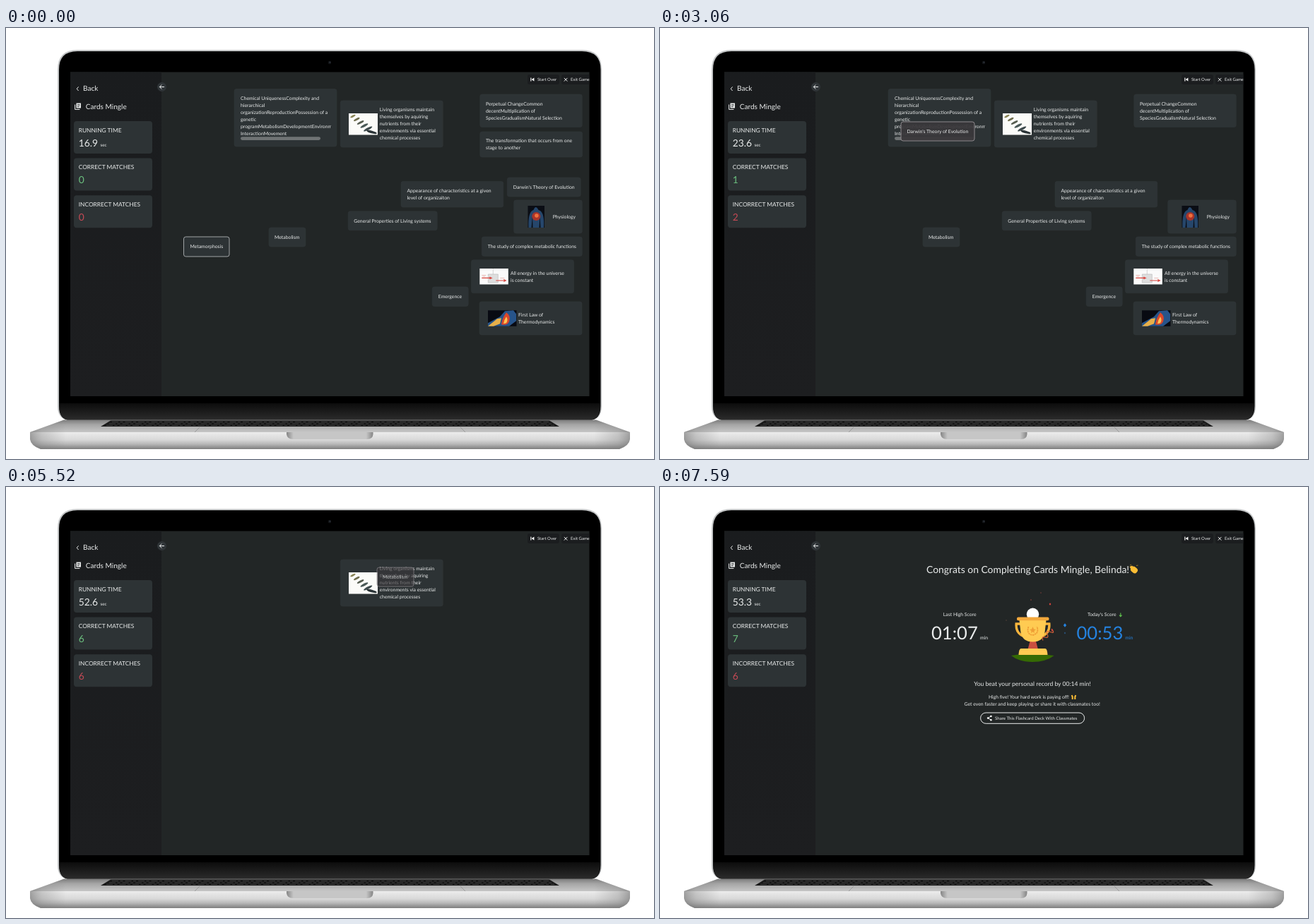
Animation, 917 px wide and 611 px high, one loop 7.62 s. Source, as an HTML page:

```html
<!DOCTYPE html>
<html lang="en">
<head>
<meta charset="utf-8">
<title>Flashcard matching game</title>
<style>
  html, body { margin: 0; width: 100%; height: 100%; overflow: hidden; background: #fff; }
  svg { display: block; width: 917px; height: 611px; }
  text { font: 6.85px Lato, "Open Sans", sans-serif; fill: #e9ebeb; text-rendering: geometricPrecision; white-space: pre; }
  .box { fill: #2d3335; }
  .card rect.box { stroke: #33393b; stroke-width: .5; }
  .card.lit rect.box { stroke: #a0a4a5; stroke-width: 1; }
  .card.held rect.box { fill: #3a373b; fill-opacity: .93; stroke: #8d888c; stroke-width: 1; }
  .label { font-size: 8.4px; }
  .value { font-size: 13.8px; }
  .unit { font-size: 6.4px; }
  .nav { font-size: 10.05px; }
  .tool { font-size: 6px; }
  .good { fill: #6cc07f; }
  .bad { fill: #c64a55; }
  .title { font-size: 13.9px; }
  .time { font-size: 25.6px; }
  .today { fill: #2583e0; }
  .line { fill: none; stroke: #eceeee; stroke-width: 1; }
</style>
</head>
<body>
<svg viewBox="0 0 917 611" xmlns="http://www.w3.org/2000/svg">
  <defs>
    <linearGradient id="chin" x2="0" y2="1"><stop stop-color="#0c0c0c"/><stop offset="1" stop-color="#2c2c2c"/></linearGradient>
    <linearGradient id="deck" x2="0" y2="1"><stop stop-color="#7c7c7c"/><stop offset=".4" stop-color="#a6a6a6"/><stop offset="1" stop-color="#c6c6c6"/></linearGradient>
    <linearGradient id="front" x2="0" y2="1"><stop stop-color="#ececec"/><stop offset=".45" stop-color="#d8d8d8"/><stop offset=".7" stop-color="#b8b8b8"/><stop offset="1" stop-color="#7e7e7e"/></linearGradient>
    <linearGradient id="ends">
      <stop stop-color="#555" stop-opacity=".5"/><stop offset=".02" stop-color="#777" stop-opacity=".3"/><stop offset=".06" stop-color="#777" stop-opacity="0"/>
      <stop offset=".94" stop-color="#777" stop-opacity="0"/><stop offset=".98" stop-color="#777" stop-opacity=".3"/><stop offset="1" stop-color="#555" stop-opacity=".5"/>
    </linearGradient>
    <linearGradient id="notch"><stop stop-color="#858585"/><stop offset=".08" stop-color="#c6c6c6"/><stop offset=".92" stop-color="#c6c6c6"/><stop offset="1" stop-color="#858585"/></linearGradient>
    <linearGradient id="side" x2="0" y2="1"><stop stop-color="#1a1c1e"/><stop offset="1" stop-color="#1d1e20"/></linearGradient>
    <clipPath id="screen"><rect x="91" y="62.5" width="734.5" height="459.5"/></clipPath>
    <clipPath id="scroll"><rect x="331" y="88" width="129" height="78"/></clipPath>
  </defs>

  <!-- lid -->
  <path d="M73 59Q73 31 101 31H815Q843 31 843 59V536Q843 556 825 556H91Q73 556 73 536Z" fill="#c3c5c6"/>
  <path d="M75 59Q75 33 101 33H815Q841.5 33 841.5 59V536Q841.5 556 825 556H91Q75 556 75 536Z"/>
  <path d="M75.5 532H841V537Q840 556 825 556H91Q76 556 75.5 537Z" fill="url(#chin)"/>
  <circle cx="458" cy="49" r="2.2" fill="#15171a"/><circle cx="458.4" cy="48.6" r=".8" fill="#39414c"/>

  <!-- base -->
  <path d="M82 555.5H835L883 573H34Z" fill="url(#deck)"/>
  <path d="M82 555.5H835L883 573H34Z" fill="url(#ends)"/>
  <path d="M148 556.5H769L783 565H134Z" fill="#191919"/>
  <path d="M150 558.5H768M146 561H772M142 563.4H776" stroke="#4a4a4a" stroke-width=".8" stroke-dasharray="9 2.5 4 3"/>
  <path d="M274 566L267 573M643 566L650 573" stroke="#8b8b8b" stroke-width=".7"/>
  <path d="M34 573H883V583Q882 592 868 597H49Q35 592 34 583Z" fill="url(#front)"/>
  <path d="M34 573H883V583Q882 592 868 597H49Q35 592 34 583Z" fill="url(#ends)"/>
  <path d="M397 573H519.5V576Q519 583 511 583H406Q398 583 397 576Z" fill="url(#notch)"/>

  <g clip-path="url(#screen)">
    <rect x="91" y="62" width="735" height="460" fill="#222626"/>
    <rect x="91" y="62" width="129" height="460" fill="url(#side)"/>

    <path class="line" d="M102.6 83.4L100.2 86.2L102.6 89"/>
    <text class="nav" x="109" y="88.8">Back</text>
    <path d="M99.5 106.5H106V113.5H99.5Z" fill="#eceeee"/>
    <path class="line" d="M97.6 108.5V115.4H104.4"/>
    <path d="M101 108.5H104.7M101 110.1H104.7M101 111.7H103.4" stroke="#1b1d1f" stroke-width=".7"/>
    <text class="nav" x="112.8" y="115.4">Cards Mingle</text>
    <g id="stats"></g>
    <circle cx="220.5" cy="83.5" r="6.5" fill="#303538"/>
    <path class="line" d="M224 83.5H217.4M220.3 80.5L217.3 83.5L220.3 86.5"/>

    <rect x="738" y="66" width="45" height="14" rx="3" fill="#1b1d1f"/>
    <rect x="786" y="66" width="46" height="14" rx="3" fill="#1b1d1f"/>
    <path d="M742.3 70.6H743.4V75.6H742.3ZM747.4 70.6V75.6L743.7 73.1Z" fill="#fff"/>
    <path class="line" d="M789.8 70.9L794.4 75.5M794.4 70.9L789.8 75.5"/>
    <text class="tool" x="752" y="75.2">Start Over</text>
    <text class="tool" x="799" y="75.2">Exit Game</text>

    <g id="board"></g>

    <g id="finish">
      <text class="title" x="377" y="122.2">Congrats on Completing Cards Mingle, Belinda!</text>
      <g fill="#fcbd34"><rect x="666" y="113.5" width="10" height="8" rx="3.6" transform="rotate(40 671 117.5)"/><path d="M664.5 113L668 111.5L673 116L668 119Z"/></g>
      <path d="M665 111L667 110M674 111.5L676.5 111" stroke="#b98b2a" stroke-width=".8"/>
      <text x="400.8" y="183.3">Last High Score</text>
      <text class="time" x="384" y="216.3">01:07</text>
      <text x="453" y="216">min</text>
      <text x="605" y="183.3">Today's Score</text>
      <path d="M651.8 178.5V183.5M650 181.6L651.8 183.6L653.6 181.6" fill="none" stroke="#5fc34d" stroke-width="1.1"/>
      <text class="time today" x="589.5" y="216.3">00:53</text>
      <text class="today" x="658.3" y="216">min</text>

      <path d="M497 239Q527 234 557.5 239Q546 248 527 248Q508 248 497 239Z" fill="#356a04"/>
      <path d="M524 217H531.5L535 230H520.5Z" fill="#cb4f3f"/>
      <path d="M511 229H545Q548 229 548.5 238H507.5Q508 229 511 229Z" fill="#ffcb52"/>
      <circle id="ball" cx="527.5" r="8.7" fill="#fff"/>
      <g id="cup">
        <path id="ears" d="M510 194H504.2Q503 208 516 212M545 194H550.8Q552 208 539 212" fill="none" stroke="#f6b43c" stroke-width="3.4"/>
        <path d="M508.5 189H546.5L544.5 206Q542 219.5 527.5 219.5Q513 219.5 510.5 206Z" fill="#ffcb52"/>
        <rect x="505" y="184.5" width="45.5" height="4.8" rx="2" fill="#f2a83c"/>
        <g id="emblem"><path d="M521.5 198Q518 208 527 210Q537 208 533.5 198" fill="none" stroke="#ef9f35" stroke-width="1.8" stroke-dasharray="2.4 .7"/>
        <path d="M527.5 198L529 201.5L532 202L529.5 204L530 207L527.5 205.3L525 207L525.5 204L523 202L526 201.5Z" fill="#ef9f35"/></g>
      </g>
      <path id="ribbon" d="M-4 5Q-6 1 -2 2T0 -1T3 -3T4 -6" fill="none"/>
      <g id="confetti"></g>

      <text x="444.3" y="282.4" style="font-size:8.56px">You beat your personal record by 00:14 min!</text>
      <text x="465" y="300.2" style="font-size:6.75px">High five! Your hard work is paying off!</text>
      <path d="M583.7 301V297.5L582.7 295.2M587.3 301V297.5L588.3 295.2" stroke="#fcbd34" stroke-width="2" fill="none"/>
      <text x="430.5" y="310.2">Get even faster and keep playing or share it with classmates too!</text>
      <rect class="line" x="453.6" y="320" width="147" height="15.3" rx="7.6"/>
      <path class="line" d="M468.4 325L464.2 327.6L468.4 330.2"/>
      <g fill="#fff"><circle cx="468.4" cy="325" r="1.3"/><circle cx="464.2" cy="327.6" r="1.3"/><circle cx="468.4" cy="330.2" r="1.3"/></g>
      <text x="474" y="329.7" style="font-size:6.14px">Share This Flashcard Deck With Classmates</text>
    </g>
  </g>
</svg>
<script>
const LOOP = 7620, FADE = 100, FINISH = 6265;
const $ = id => document.getElementById(id);

function add(parent, tag, attrs, content) {
  const el = document.createElementNS("http://www.w3.org/2000/svg", tag);
  for (const k in attrs) el.setAttribute(k, attrs[k]);
  if (content) el.textContent = content;
  parent.append(el);
  return el;
}

// sidebar
const stats = ["RUNNING TIME", "CORRECT MATCHES", "INCORRECT MATCHES"].map((label, i) => {
  const y = 132 + i * 52.6, g = $("stats");
  add(g, "rect", { class: "box", x: 96, y, width: 111, height: 46, rx: 4 });
  add(g, "text", { class: "label", x: 102.7, y: y + 15.6 }, label);
  const value = add(g, "text", { class: "value " + ["", "good", "bad"][i], x: 102.7, y: y + 35.8 });
  const number = add(value, "tspan", {});
  if (!i) add(value, "tspan", { class: "unit", dx: 3.5 }, "sec");
  return number;
});

// small pictures, drawn from their top left corner
const pictures = {
  larvae(g) {
    add(g, "rect", { width: 41, height: 30.5, fill: "#fbfbf8" });
    ["#8a8556", "#6f6d4e", "#565d50", "#4b5a58", "#3d4a4c", "#2c3538"].forEach((fill, i) =>
      add(g, "ellipse", { rx: 4 + i * .7, ry: 1.3 + i * .12, fill, transform: `translate(${6 + i * 5.3} ${4 + i * 4.5}) rotate(${i < 5 ? -28 : 15})` }));
  },
  body(g) {
    add(g, "rect", { width: 23.5, height: 31, fill: "#0a0d14" });
    add(g, "path", { d: "M1 31Q0 8 8 6Q11 -2 15 6Q24 8 22.5 31H18L17 15L16 31H7L6.5 15L5 31Z", fill: "#26466b" });
    add(g, "ellipse", { cx: 11.8, cy: 15, rx: 6, ry: 6, fill: "#a8342a" });
    add(g, "circle", { cx: 12.4, cy: 14, r: 2.8, fill: "#f0703c" });
  },
  engine(g) {
    add(g, "rect", { width: 40.5, height: 22.5, fill: "#fafafa" });
    add(g, "path", { d: "M12 8H26V20H12ZM19 0V8", fill: "#dedede", stroke: "#aaa", "stroke-width": .5 });
    add(g, "path", { d: "M3 13.4H16M14 12L17 13.4L14 14.8M23 17H36M34 15.6L37 17L34 18.4", fill: "none", stroke: "#d8453e", "stroke-width": 1.1 });
    add(g, "path", { d: "M3 9.5H9M4 11.2H8M29 13.5H35", stroke: "#e2a5a0", "stroke-width": .7 });
  },
  heat(g) {
    add(g, "rect", { width: 40.5, height: 22.5, fill: "#080a12" });
    add(g, "path", { d: "M0 22.5V18L17 9L24 1L36 0L40 5V15L30 22.5Z", fill: "#27548a" });
    add(g, "path", { d: "M0 22.5L13 12L19 11L17 19L8 22.5Z", fill: "#e8b04a" });
    add(g, "path", { d: "M19 20Q20 11 26 3Q33 8 30 16Q27 22 19 20Z", fill: "#d9472b" });
    add(g, "path", { d: "M22 19Q23 13 26 9Q29 14 26 18Z", fill: "#ffc554" });
  }
};

// id, x, y, w, h, text x, lines, picture [name, x, y]
const cards = {};
[
  ["traits", 323, 86.5, 145, 81.5, 332, ["Chemical UniquenessComplexity and", "hierarchical", "organizationReproductionPossession of a", "genetic", "programMetabolismDevelopmentEnvironment", "InteractionMovement"]],
  ["living", 473.3, 103, 145, 66, 528.8, ["Living organisms maintain", "themselves by aquiring", "nutrients from their", "environments via essential", "chemical processes"], ["larvae", 485, 121]],
  ["change", 670.8, 94, 144.5, 46.6, 679, ["Perpetual ChangeCommon", "decentMultiplication of", "SpeciesGradualismNatural Selection"]],
  ["stages", 670.8, 147, 144.8, 36, 679, ["The transformation that occurs from one", "stage to another"]],
  ["levels", 559, 217.4, 144.8, 36.6, 567.5, ["Appearance of characteristics at a given", "level of organizaiton"]],
  ["study", 673.3, 296, 142, 27.4, 681.7, ["The study of complex metabolic functions"]],
  ["energy", 658.5, 328.8, 145, 47, 714, ["All energy in the universe", "is constant"], ["engine", 670.3, 341]],
  ["general", 484.2, 259.8, 126, 27, 492.3, ["General Properties of Living systems"]],
  ["darwin", 709.3, 212, 104, 27, 717.8, ["Darwin's Theory of Evolution"]],
  ["emergence", 603.2, 367, 51, 27.5, 611.8, ["Emergence"]],
  ["physiology", 718.7, 244, 96.6, 47, 773.7, ["Physiology"], ["body", 738.5, 252]],
  ["law", 670, 388, 145, 47, 725, ["First Law of", "Thermodynamics"], ["heat", 682, 400.3]],
  ["metamorphosis", 251.5, 296, 64.5, 28, 260.4, ["Metamorphosis"]],
  ["metabolism", 372, 283, 52, 27, 380, ["Metabolism"]]
].forEach(([id, x, y, width, height, tx, lines, pic]) => {
  const el = add($("board"), "g", { class: "card" });
  add(el, "rect", { class: "box", x, y, width, height, rx: 3 });
  if (pic) pictures[pic[0]](add(el, "g", { transform: `translate(${pic[1]} ${pic[2]})` }));
  const body = add(el, "g", id === "traits" ? { "clip-path": "url(#scroll)" } : {});
  const top = y + height / 2 - (lines.length - 1) * 5 + 2.3 - (id === "traits" ? 2.7 : 0);
  lines.forEach((line, i) => add(body, "text", { x: tx, y: top + i * 9.95 }, line));
  if (id === "traits") add(body, "rect", { x: 332, y: 154.2, width: 113, height: 4.8, rx: 2.4, fill: "#6f7374" });
  cards[id] = { el, gone: Infinity };
});

// card, start, arrival, dx, dy, release, matching card (none for a miss)
const drags = [
  ["metamorphosis", 840, 1650, 430, -139, 1740, "stages"],
  ["general", 2370, 2480, 200, -160, 2520],
  ["darwin", 2580, 2700, -130, 12, 2760],
  ["darwin", 2820, 3040, -368.3, -79, 3130],
  ["darwin", 3170, 3240, -30, -110, 3260, "change"],
  ["emergence", 3290, 3340, 90, -68, 3360],
  ["emergence", 3380, 3430, -20, -140, 3440, "levels"],
  ["physiology", 3460, 3500, -200, 10, 3510],
  ["physiology", 3525, 3560, -50, 85, 3570],
  ["general", 3585, 3625, -150, -150, 3630, "traits"],
  ["physiology", 3650, 3685, -30, 50, 3690, "study"],
  ["law", 4650, 5000, -10, -58, 5060, "energy"],
  ["metabolism", 5425, 5485, 153, -169, 5490, "living"]
].map(([id, start, arrive, dx, dy, end, match]) => {
  if (match) cards[id].gone = cards[match].gone = end + FADE;
  return { id, start, arrive, dx, dy, end, match };
});
const hovers = [["metamorphosis", 0, 840], ["law", 3760, 4650], ["metabolism", 5250, 5425]];

const clock = [[0, 16.9], [810, 16.9], [2130, 18.2], [2340, 18.4], [3060, 23.6], [3150, 24.2], [3795, 50.8], [5520, 52.6], [6210, 53.3], [LOOP, 53.3]];

// x, y, size, colour, burst
const confetti = [
  [503, 162, 1, "#3fae5a", 0], [524, 156, 1, "#3fae5a", 0], [538, 157, 2.2, "#2583e0", 0], [552, 168, 1.4, "#d8453e", 0],
  [515, 177, 2, "#d8453e", 0], [524, 185, 1, "#3fae5a", 0], [572, 180, 1, "#3fae5a", 0], [573, 199, 2, "#2583e0", 0],
  [562, 227, 1.9, "#d8453e", 0], [500, 222, 1.2, "#3fae5a", 0], [490, 214, .7, "#35663f", 0],
  [539, 150, .9, "#6d3a38", 1], [525, 160, 1, "#7d3b38", 1], [552, 166, 1.4, "#d8453e", 1], [490, 189, .9, "#4d4138", 1],
  [573, 196, 2.2, "#2583e0", 1], [573, 207, 1.2, "#2a5685", 1], [555, 203, 1.4, "#d8453e", 1]
].map(([x, y, size, fill, burst]) => ({
  x, y, burst,
  el: add($("confetti"), "path", { d: `M0 ${-size * 1.3}L${size} 0L0 ${size * 1.3}L${-size} 0Z`, fill })
}));

const part = (t, a, b) => Math.min(1, Math.max(0, (t - a) / (b - a)));
const ease = p => p * p * (3 - 2 * p);
const out = p => 1 - (1 - p) ** 3;
const mix = (a, b, p) => a + (b - a) * p;

function seconds(t) {
  const i = clock.findIndex(k => k[0] > t);
  const [a, from] = clock[i - 1], [b, to] = clock[i];
  const s = mix(from, to, part(t, a, b));
  return (Math.floor(s * 10 + .02) / 10).toFixed(1);
}

function drawCards(t) {
  for (const id in cards) {
    const { el, gone } = cards[id];
    const drag = drags.find(d => d.id === id && t >= d.start && t < d.end + (d.match ? FADE : 0));
    const p = drag ? ease(part(t, drag.start, drag.arrive)) : 0;
    const lit = hovers.some(([h, a, b]) => h === id && t >= a && t < b);
    el.style.display = t < gone ? "" : "none";
    el.setAttribute("class", "card" + (drag ? " held" : lit ? " lit" : ""));
    el.setAttribute("transform", drag ? `translate(${drag.dx * p} ${drag.dy * p})` : "");
    el.setAttribute("opacity", drag ? 1 - part(t, drag.end, drag.end + FADE) : 1);
  }
}

function drawFinish(t) {
  $("finish").style.display = t < FINISH ? "none" : "";
  const grow = ease(part(t, 6950, 7200));
  const scale = .78 * out(part(t, FINISH, 6520)) + .22 * grow;
  $("cup").setAttribute("transform", `translate(527.5 220) scale(${scale}) translate(-527.5 -220)`);
  $("ears").setAttribute("opacity", grow);
  $("emblem").setAttribute("opacity", part(t, 7150, 7350));
  $("ball").setAttribute("cy", mix(200, 180.3, out(part(t, 7250, 7520))));
  $("ball").setAttribute("opacity", t < 7250 ? 0 : 1);

  const fall = ease(part(t, 6900, 7560));
  const fly = out(part(t, 6450, 6880));
  $("ribbon").setAttribute("transform", `translate(${mix(528, 550, fly) - 2 * fall} ${mix(198, 188, fly) + 22 * fall}) scale(${mix(.3, .9, fly) + .6 * fall})`);
  $("ribbon").setAttribute("stroke", fall < .5 ? "#eda03a" : "#d5623a");
  $("ribbon").setAttribute("stroke-width", mix(1.6, .8, fall));
  $("ribbon").setAttribute("opacity", part(t, 6450, 6500));

  for (const c of confetti) {
    const start = c.burst ? 7150 : 6450;
    const p = out(part(t, start, start + 420));
    const drop = c.burst ? 0 : 14 * part(t, 6900, 7250) ** 2;
    c.el.setAttribute("transform", `translate(${mix(527, c.x, p)} ${mix(190, c.y, p) + drop})`);
    c.el.setAttribute("opacity", part(t, start, start + 80) * (c.burst ? 1 : 1 - part(t, 6960, 7250)));
  }
}

function draw(now) {
  const t = now % LOOP;
  stats[0].textContent = seconds(t);
  stats[1].textContent = drags.filter(d => d.match && t >= d.end + FADE).length;
  stats[2].textContent = drags.filter(d => !d.match && t >= d.end).length;
  drawCards(t);
  drawFinish(t);
}

const begin = performance.now();
function tick() {
  draw(performance.now() - begin);
  requestAnimationFrame(tick);
}
tick();
</script>
</body>
</html>
```
